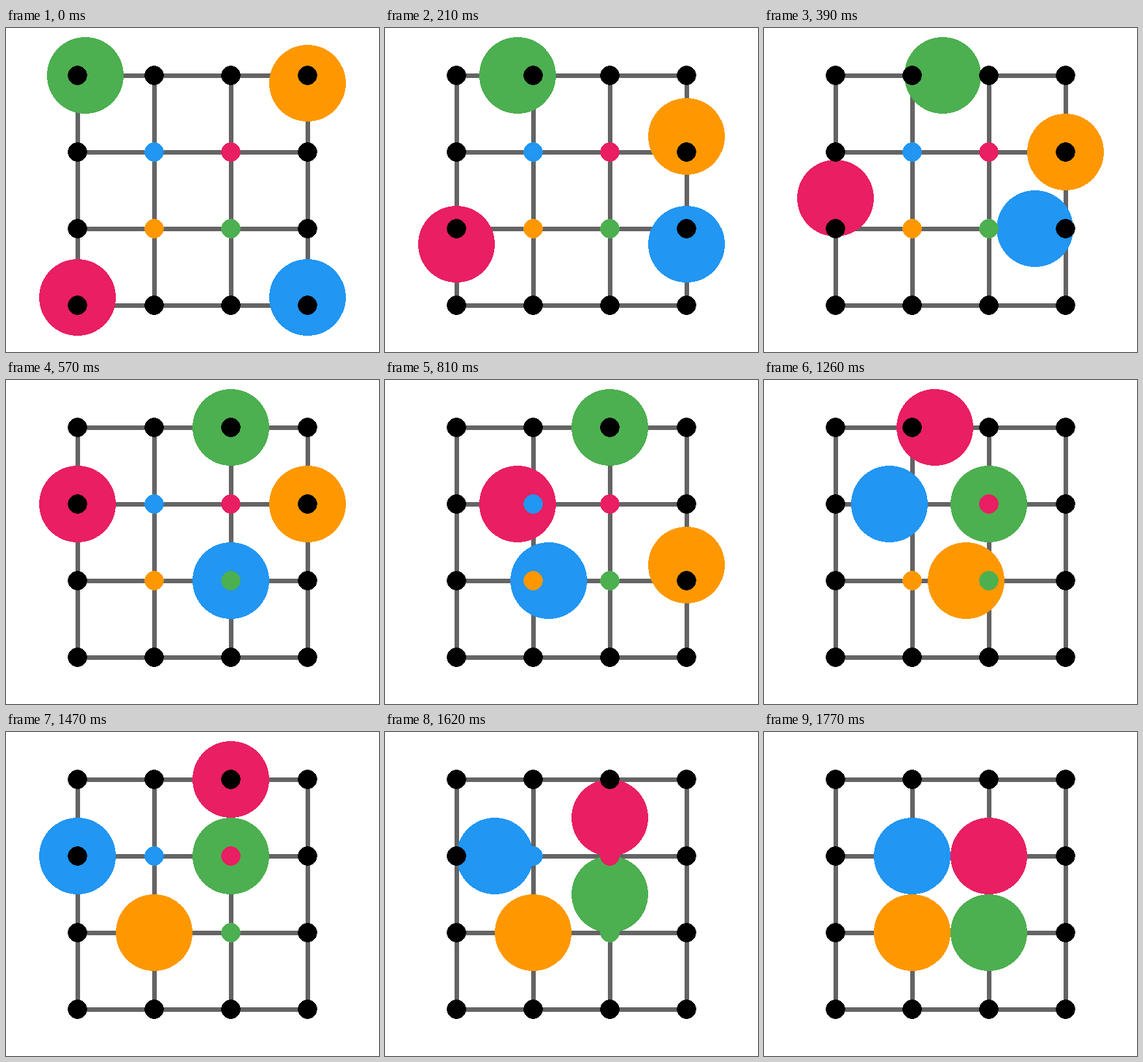
These frames come from a looping animation (574x499 px, 1800 ms). An HTML page:

```html
<!DOCTYPE html>
<html lang="en">
<head>
<meta charset="utf-8">
<title>Discs on a grid</title>
<style>
  html, body { margin: 0; width: 100%; height: 100%; overflow: hidden; background: #fff; }
  svg { display: block; }
</style>
</head>
<body>
<svg width="574" height="499" shape-rendering="crispEdges"></svg>
<script>
const svg = document.querySelector("svg");
const CELL = 118, LEFT = 110, TOP = 73, FRAME = 30, FRAMES = 60, STEP = 10;
const GREEN = "#4caf50", ORANGE = "#ff9800", PINK = "#e91e63", BLUE = "#2196f3";

const px = col => Math.round(LEFT + col * CELL);
const py = row => Math.round(TOP + row * CELL);

function add(tag, attrs) {
  const el = document.createElementNS("http://www.w3.org/2000/svg", tag);
  for (const key in attrs) el.setAttribute(key, attrs[key]);
  return svg.appendChild(el);
}

// Each route is a start cell and six moves: L, R, U, D, or "." to wait.
const MOVES = { L: [-1, 0], R: [1, 0], U: [0, -1], D: [0, 1], ".": [0, 0] };
const discs = [
  [GREEN, 0, 0, "RR.D.D"],
  [ORANGE, 3, 0, "D.DLL."],
  [PINK, 0, 3, "UURURD"],
  [BLUE, 3, 3, "ULLULR"]
];

let grid = "";
for (let i = 0; i < 4; i++) {
  grid += `M${px(0)} ${py(i) + 0.5}H${px(3)}M${px(i) + 0.5} ${py(0)}V${py(3)}`;
}
add("path", { d: grid, stroke: "#646464", "stroke-width": 7 });

const shapes = discs.map(([fill]) => add("circle", { r: 59, fill }));

const goals = { "1,1": BLUE, "2,1": PINK, "1,2": ORANGE, "2,2": GREEN };
for (let row = 0; row < 4; row++) {
  for (let col = 0; col < 4; col++) {
    add("circle", { cx: px(col), cy: py(row), r: 14.75, fill: goals[`${col},${row}`] || "#000" });
  }
}

function draw(ms) {
  const frame = Math.floor(ms / FRAME) % FRAMES;
  const progress = (frame + 1) / STEP;
  discs.forEach(([, col, row, route], i) => {
    [...route].forEach((move, n) => {
      const part = Math.max(0, Math.min(1, progress - n));
      col += MOVES[move][0] * part;
      row += MOVES[move][1] * part;
    });
    shapes[i].setAttribute("cx", px(col));
    shapes[i].setAttribute("cy", py(row));
  });
}

const start = performance.now();
function tick() {
  draw(performance.now() - start);
  requestAnimationFrame(tick);
}
tick();
</script>
</body>
</html>
```
